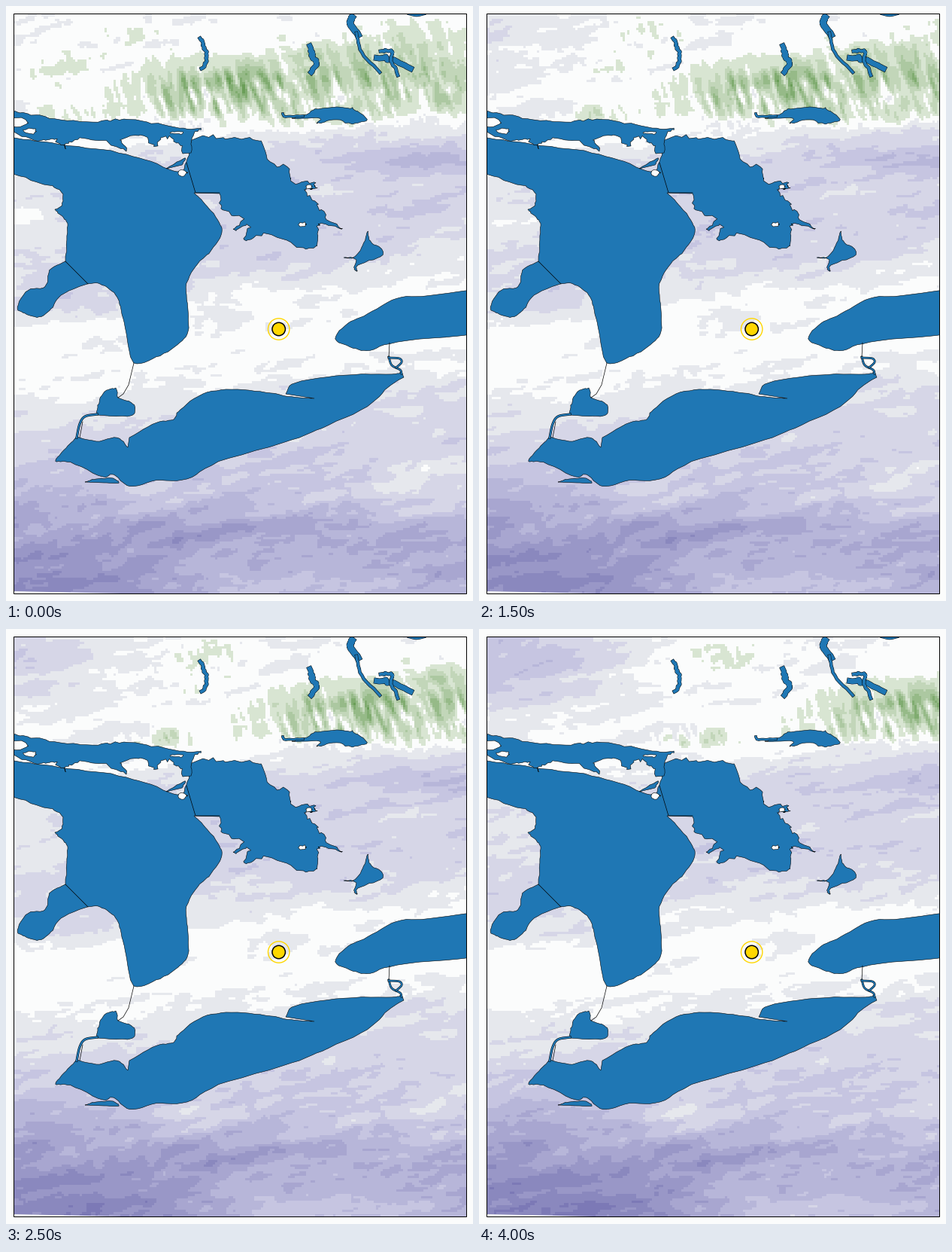
A matplotlib script that plays this animation: 621 by 790 pixels, repeating every 4500 ms.

```python
import numpy as np
import matplotlib.pyplot as plt
from matplotlib.animation import FuncAnimation
from matplotlib.patches import Circle, Polygon, Rectangle

W, H, DPI = 621, 790, 100
FRAMES, STEP = 9, 500
X0, X1, Y0, Y1 = 11, 612, 11, 780
COLS, ROWS = 200, 256
WATER, PAPER = "#1f77b4", "#fbfcfc"
WARMEST, COLDEST = -6, 8

rng = np.random.default_rng(12)


def ramp(a, b, n):
    return np.linspace(a, b, n)


# warm greens, neutral, cold purples
PALETTE = np.vstack([
    ramp((106, 158, 88), (216, 229, 210), 6), [(251, 252, 252)],
    ramp((230, 232, 237), (198, 197, 225), 3),
    ramp((183, 182, 217), (124, 121, 182), 5)]).astype(np.uint8)

# temperature level down the middle of the map
PROFILE_Y = [11, 165, 185, 215, 320, 385, 405, 470, 520, 600, 640, 690, 780]
PROFILE = [.25, .05, 1, 2, 2.2, .6, .05, .05, 1.2, 2.6, 3.1, 4.4, 4.2]

# patches: x, y, width, height, strength at start and end, speed per step
COLD = [
    (20, 785, 170, 55, 2.6, 3.5, 8),
    (300, 775, 80, 28, -1.2, -1.7, 10),
    (570, 638, 95, 30, -1.9, -.9, 2),
    (210, 645, 45, 14, -.6, -1.5, 9),
    (420, 695, 110, 16, .5, 0, 4),
    (560, 206, 85, 13, 1.8, 1.6, 8),
    (-60, 25, 125, 60, .3, 3, 10),
    (11, 270, 70, 55, -1.2, -.8, 0),
    (60, 640, 90, 22, .6, .9, 0),
    (90, 388, 50, 16, 1.4, .8, 0)]
WARM = [
    (320, 99, 62, 18, 2.9, 2.8, 33),
    (235, 107, 42, 19, 1.7, .8, 33),
    (425, 84, 60, 27, 1.9, 1.9, 33),
    (550, 80, 75, 33, 2.2, 2, 33),
    (340, 132, 130, 17, 1.1, .9, 33),
    (610, 115, 50, 14, 1, 1, 33),
    (70, 76, 32, 20, 1.1, 0, 33),
    (170, 38, 42, 18, .9, 1.2, 19),
    (70, 144, 32, 8, .7, 1.5, 27)]


def cloud(sx, sy, slant=0., lean=0.):
    """Seeded noise of unit spread, smoothed sx by sy cells."""
    noise = np.fft.fft2(rng.normal(size=(ROWS, 2 * COLS)))
    fy = np.fft.fftfreq(ROWS)[:, None]
    fx = np.fft.fftfreq(2 * COLS)[None, :]
    blur = ((fx + slant * fy) * sx) ** 2 + ((fy + lean * fx) * sy) ** 2
    out = np.fft.ifft2(noise * np.exp(-2 * np.pi ** 2 * blur)).real
    return out / out.std()


WISPS = cloud(9, 1.8, slant=-.16)
GRAIN = cloud(2, .8, slant=-.1)
COMB = cloud(.8, 3.2, lean=.3)

cell_x = X0 + (np.arange(COLS) + .5) * (X1 - X0) / COLS
cell_y = Y0 + (np.arange(ROWS) + .5) * (Y1 - Y0) / ROWS
PX, PY = np.meshgrid(cell_x, cell_y)
TILT = .1 * np.clip((680 - PY) / 150, 0, 1) * (PX - 311)
BASE = np.interp(PY + TILT, PROFILE_Y, PROFILE)
SPEED = np.interp(cell_y, [160, 250, 540], [33, 22, 9])
ROUGH = np.interp(PY, [560, 680], [.27, .38])
FINGERS = np.interp(PY, [85, 145], [.25, .8])


def drift(texture, i):
    shift = np.rint(SPEED * i * COLS / (X1 - X0)).astype(int)
    cols = (np.arange(COLS) - shift[:, None]) % (2 * COLS)
    return np.take_along_axis(texture, cols, axis=1)


def bumps(patches, i):
    s = i / (FRAMES - 1)
    return sum((a + (b - a) * s)
               * np.exp(-((PX - x - v * i) / w) ** 2 / 2 - ((PY - y) / h) ** 2 / 2)
               for x, y, w, h, a, b, v in patches)


def weather(i):
    value = BASE + bumps(COLD, i)
    value += ROUGH * (drift(WISPS, i) + .7 * drift(GRAIN, i))
    value = np.maximum(value, 0)
    value -= bumps(WARM, i) * np.maximum(1 + FINGERS * drift(COMB, i), 0)
    level = np.clip(np.rint(value), WARMEST, COLDEST).astype(int)
    return PALETTE[level - WARMEST]


def coast(pts, rough=.3, n=6):
    """Smooth curve through key points, with a seeded ragged edge."""
    p = np.array(pts, float)
    q = np.vstack([2 * p[0] - p[1], p, 2 * p[-1] - p[-2]])
    t = np.linspace(0, 1, n, endpoint=False)[:, None]
    parts = [b + ((c - a) * t + (2 * a - 5 * b + 4 * c - d) * t ** 2
                  + (3 * b - a - 3 * c + d) * t ** 3) / 2
             for a, b, c, d in zip(q, q[1:], q[2:], q[3:])]
    out = np.vstack(parts + [p[-1:]])
    out[1:-1] += rng.normal(0, rough, (len(out) - 2, 2))
    return out


fig = plt.figure(figsize=(W / DPI, H / DPI), dpi=DPI, facecolor=PAPER)
ax = fig.add_axes([X0 / W, 1 - Y1 / H, (X1 - X0) / W, (Y1 - Y0) / H])
image = ax.imshow(weather(0), extent=(X0, X1, Y1, Y0), aspect="auto",
                  interpolation="nearest")
ax.set_xlim(X0, X1)
ax.set_ylim(Y1, Y0)
ax.axis("off")


def lake(*arcs, color=WATER):
    ax.add_patch(Polygon(np.vstack(arcs), fc=color, ec="black", lw=.4, zorder=2))


def line(pts, width=.5, color="black"):
    ax.plot(*np.transpose(pts), color=color, lw=width, zorder=3)


def river(pts, width, rough=0.):
    path = coast(pts, rough)
    line(path, width + .7)
    line(path, width, WATER)


# great western lake with both bays, clockwise from the top left
lake(
    coast([(5, 174), (60, 182), (130, 191), (185, 204), (228, 220),
           (240, 207), (247, 178)], .5),
    coast([(262, 172), (300, 176), (335, 179), (352, 208), (375, 214),
           (380, 232), (408, 234), (410, 243), (398, 247), (413, 262),
           (424, 280), (447, 297), (421, 289), (414, 297), (414, 318),
           (395, 321), (345, 302), (320, 313), (321, 292), (302, 297),
           (316, 283), (290, 273), (284, 249)], 1.5),
    coast([(250, 248), (265, 263), (284, 288), (286, 304), (270, 328),
           (255, 342), (240, 368), (242, 400), (242, 432), (228, 450),
           (200, 466), (170, 474), (161, 440), (153, 403), (146, 384),
           (128, 370), (109, 369), (73, 384), (60, 402), (44, 413),
           (25, 408), (15, 400), (29, 377), (52, 373), (58, 351), (79, 339)]),
    coast([(79, 339), (82, 300), (78, 282), (66, 272), (76, 262), (72, 244),
           (45, 235), (5, 221)], .7))
line([(240, 208), (252, 248), (284, 248)])
line([(79, 339), (109, 369)])

# island channel
lake(
    coast([(5, 139), (28, 143), (65, 150), (115, 154), (150, 151), (195, 155),
           (235, 163), (259, 163), (248, 172), (246, 195)], .8),
    coast([(235, 196), (225, 178), (211, 173), (197, 185), (180, 172),
           (153, 178), (160, 190), (128, 180), (90, 178), (78, 186),
           (62, 177), (42, 178), (5, 168)], 1.5))
lake(coast([(213, 216), (238, 202), (234, 211)]))
for x, y, w, h in [(14, 154, 15, 6), (32, 166, 8, 4), (226, 168, 8, 2),
                   (234, 222, 6, 4), (395, 290, 5, 3), (403, 240, 4, 3),
                   (145, 600, 3, 5)]:
    a = np.linspace(0, 2 * np.pi, 12)
    ring = np.c_[x + w * np.cos(a), y + h * np.sin(a)]
    lake(ring + rng.normal(0, .8, ring.shape), color=PAPER)

# southern lakes
lake(coast([(121, 543), (123, 528), (131, 512), (146, 508), (150, 520),
            (169, 528), (167, 544), (121, 543)], .5))
river([(121, 542), (105, 545), (98, 555), (94, 573)], 1.6)
line([(102, 552), (98, 573)])
lake(coast([(94, 572), (120, 578), (148, 573), (162, 586)]),
     coast([(164, 573), (200, 553), (222, 549), (232, 536), (262, 515),
            (300, 509), (345, 513), (380, 519), (410, 521)]),
     coast([(372, 515), (385, 500), (450, 490), (513, 489), (526, 486)]),
     coast([(529, 493), (508, 506), (480, 532), (420, 560), (380, 576),
            (283, 605), (241, 628), (200, 630), (165, 638), (143, 622),
            (128, 625), (86, 606), (66, 604), (80, 587), (94, 572)]))
lake(coast([(105, 632), (120, 628), (140, 627), (150, 633), (130, 633)]))
lake(coast([(620, 377), (560, 385), (520, 388), (481, 409), (455, 421),
            (438, 442), (462, 454), (484, 457), (520, 446), (620, 436)]))

# northern and inland lakes
lake(coast([(449, 334), (464, 333), (476, 314), (481, 299), (484, 312),
            (500, 323), (498, 333), (468, 344), (467, 352), (463, 348),
            (465, 336), (449, 334)], .4))
lake(coast([(380, 149), (400, 144), (415, 136), (450, 135), (465, 138),
            (480, 151), (460, 156), (436, 151), (413, 156), (417, 149),
            (380, 149)], .6))
river([(368, 143), (372, 147), (395, 146)], 1.8, .3)
river([(258, 43), (265, 58), (267, 72), (260, 83)], 3, 1)
river([(404, 53), (407, 66), (413, 75), (406, 88)], 4.5, 1)
river([(460, 15), (458, 24), (468, 38)], 6, .5)
river([(466, 36), (473, 62), (497, 88)], 2.5, .3)
river([(493, 69), (512, 71), (538, 83)], 5, 1)
river([(498, 60), (511, 60), (513, 72), (521, 92)], 2.8, 1)
river([(536, 10), (546, 12), (556, 10)], 2.5)

# connecting rivers
line([(170, 474), (163, 503), (156, 515), (149, 520)])
line([(510, 447), (509, 466)])
river([(509, 466), (513, 477), (524, 483), (526, 488)], 1.3)
river([(509, 467), (523, 468), (526, 473), (519, 480)], 1.3)

ax.add_patch(Polygon([(11, 777), (153, 780), (11, 780)], fc=PAPER, zorder=2))
ax.add_patch(Circle((362.7, 429), 14.2, fc="none", ec="gold", lw=1, zorder=5))
ax.add_patch(Circle((362.7, 429), 8.7, fc="gold", ec="black", lw=1.1, zorder=5))
ax.add_patch(Rectangle((10.5, 10.5), 602, 770, fc="none", ec="black", lw=.72,
                       snap=False, clip_on=False, zorder=7))


def update(i):
    image.set_data(weather(i))
    return [image]


anim = FuncAnimation(fig, update, frames=FRAMES, interval=STEP, repeat=True)
plt.show()
```
